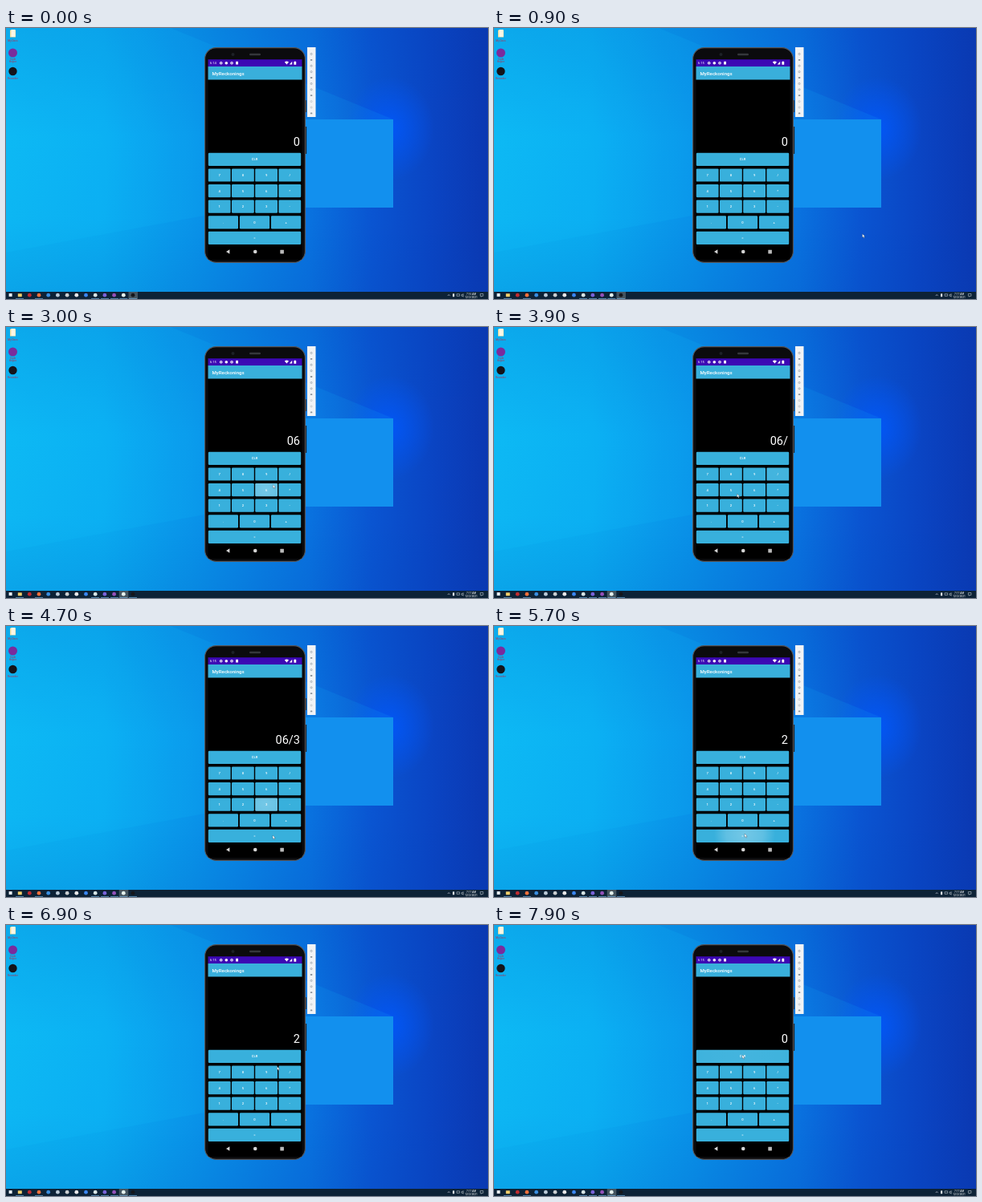
These frames come from a looping animation (600 by 338 pixels, 8 s). An HTML page:

```html
<!DOCTYPE html>
<html lang="en">
<head>
<meta charset="utf-8">
<title>Calculator demo</title>
<style>
html, body { margin: 0; width: 100%; height: 100%; overflow: hidden; background: #0a63d8; }
svg { display: block; width: 100vw; height: 100vh; }
text { font-family: Roboto, "Noto Sans", sans-serif; fill: #fff; }
.mid { text-anchor: middle; }
.label { font-size: 3.2px; fill: #b03050; }
</style>
</head>
<body>
<svg id="stage" viewBox="0 0 600 338" preserveAspectRatio="none">
  <defs>
    <linearGradient id="sky">
      <stop offset="0" stop-color="#0cb6f3"/>
      <stop offset=".2" stop-color="#0aaef2"/>
      <stop offset=".4" stop-color="#0994ea"/>
      <stop offset=".63" stop-color="#0973e0"/>
      <stop offset=".76" stop-color="#0a55d2"/>
      <stop offset=".88" stop-color="#0a45c4"/>
      <stop offset="1" stop-color="#0b38b2"/>
    </linearGradient>
    <linearGradient id="shade" x2="0" y2="1">
      <stop offset="0" stop-color="#0040b0" stop-opacity=".14"/>
      <stop offset=".4" stop-color="#0040b0" stop-opacity="0"/>
      <stop offset=".7" stop-color="#0040b0" stop-opacity=".02"/>
      <stop offset="1" stop-color="#0040b0" stop-opacity=".16"/>
    </linearGradient>
    <radialGradient id="glow">
      <stop offset="0" stop-color="#0058ff" stop-opacity=".8"/>
      <stop offset="1" stop-color="#0058ff" stop-opacity="0"/>
    </radialGradient>
    <radialGradient id="wave">
      <stop offset="0" stop-color="#fff" stop-opacity=".3"/>
      <stop offset=".6" stop-color="#fff" stop-opacity=".2"/>
      <stop offset="1" stop-color="#fff" stop-opacity="0"/>
    </radialGradient>
  </defs>
  <rect width="600" height="338" fill="url(#sky)"/>
  <rect width="600" height="338" fill="url(#shade)"/>
  <ellipse cx="478" cy="125" rx="55" ry="65" fill="url(#glow)"/>
  <path d="M482 114L205 0H0V280L482 190z" fill="#18ccff" opacity=".1"/>
  <rect x="372" y="114" width="110" height="110" fill="#1290ee"/>
  <g id="desk"></g>
  <g id="bar"></g>
  <g id="phone"></g>
  <g id="keys"></g>
  <path id="cursor" d="M0 0V4.4L1.1 3.5L1.9 5.2L2.7 4.8L1.9 3.2H3.2z" fill="#fff" stroke="#234" stroke-width=".3"/>
</svg>
<script>
const LOOP = 8000;
const $ = id => document.getElementById(id);

function add(parent, tag, attrs, text) {
  const el = document.createElementNS('http://www.w3.org/2000/svg', tag);
  for (const k in attrs) el.setAttribute(k, attrs[k]);
  if (text !== undefined) el.textContent = text;
  parent.appendChild(el);
  return el;
}
const box = (p, x, y, width, height, fill, rx = 0) => add(p, 'rect', { x, y, width, height, fill, rx });
const dot = (p, cx, cy, r, fill) => add(p, 'circle', { cx, cy, r, fill });
const write = (p, x, y, size, str, more) => add(p, 'text', { x, y, 'font-size': size, ...more }, str);
const mid = { class: 'mid' };

// desktop icons
const desk = $('desk');
box(desk, 5, 2.5, 7, 9, '#f3dfa0', .6);
box(desk, 6.5, 2, 5, 9, '#fbf6e6', .4);
dot(desk, 8.5, 31, 5.5, '#7a2c9c');
dot(desk, 8.5, 54, 5.2, '#14141a');
[[17, 'My Docs'], [39.5, 'Code'], [42.5, 'Helper'], [63.5, 'Recorder']].forEach(([y, s]) =>
  add(desk, 'text', { x: 8.5, y, class: 'mid label' }, s));

// taskbar
const bar = $('bar');
box(bar, 0, 329, 600, 9, '#0d2236');
const active = box(bar, 152.5, 329, 11.5, 9, '#44545f');
box(bar, 3.6, 331, 4, 4, '#e8f0f4');
box(bar, 14.8, 331.2, 5, 4, '#f2cf6b', .4);
['#c02c30', '#f0703c', '#3a8ee0', '#b9c8d6', '#c9cdd0', '#e6e6e8', '#3b86f0',
  '#d7e4e4', '#7a62d8', '#9350b8', '#e4f0ec', '#15161b'].forEach((c, i) =>
  dot(bar, 29.3 + i * 11.7, 333.2, 2.4, c));
[17, 41, 111, 123, 135, 146.3, 158].forEach(x => box(bar, x - 5, 337.3, 10, .7, '#6fa9d6'));
add(bar, 'path', { d: 'M549.8 334l1.4-1.5 1.4 1.5', fill: 'none', stroke: '#dde', 'stroke-width': .6 });
box(bar, 556, 331.3, 2.2, 4, '#dfe6ea', .4);
add(bar, 'path', {
  d: 'M561 331.8h3.6v2.5H561zM567 332.6h1l1.2-1v3.6l-1.2-1h-1zM590.4 331.5h3.6v2.8h-1.6l-.8 1v-1h-1.2z',
  fill: 'none', stroke: '#dde4e8', 'stroke-width': .5
});
const clock = write(bar, 579, 332.6, 3.3, '', mid);
write(bar, 579, 336.8, 3.3, '12/2/2021', mid);

// phone body and emulator strip
const phone = $('phone');
box(phone, 375, 24, 10.5, 87, '#f1f3f5');
for (let i = 0; i < 11; i++) {
  const y = 32.4 + i * 7.4;
  if (i % 3 === 1) box(phone, 378.9, y - .9, 2.4, 1.8, '#8b949c', .4);
  else add(phone, 'circle', { cx: 380.1, cy: y, r: 1.1, fill: 'none', stroke: i > 6 ? '#b3bac0' : '#87919a', 'stroke-width': .6 });
}
box(phone, 372, 90, 2, 15, '#3b3132', .6);
box(phone, 372, 123, 2.2, 34, '#20252c', .6);
add(phone, 'rect', { x: 247.6, y: 24.6, width: 124.8, height: 267.8, rx: 14, fill: '#0b0b0d', stroke: '#56565a', 'stroke-width': 1.1 });
box(phone, 251.5, 39, 117, 250, '#000', 2);
box(phone, 303, 31.8, 14, 2.4, '#34373b', 1.2);
dot(phone, 282.5, 33, 2, '#1d2126');
box(phone, 251.5, 39.2, 117, 9, '#3c08b4');
box(phone, 251.5, 48, 117, 16.5, '#39afdb');
const time = write(phone, 253.8, 45.4, 4.2, '');
[267.7, 274.3, 281, 287.5].forEach((x, i) =>
  i === 3 ? box(phone, x - 1.4, 41.8, 2.9, 3.8, '#fff', .4) : dot(phone, x, 43.8, 1.8, '#fff'));
dot(phone, 267.7, 43.8, .7, '#3c08b4');
dot(phone, 281, 43.8, .7, '#3c08b4');
add(phone, 'path', { d: 'M346.8 42.4q2.6-2 5.2 0l-2.6 3.2zM352.8 45.6h3.4v-3.8zM358.4 42h.8v-.6h1.2v.6h.8v3.8h-2.8z', fill: '#fff' });
write(phone, 256.5, 58.7, 6.1, 'MyReckonings', { 'font-weight': 500 });
const display = write(phone, 366, 147, 14.5, '0', { 'text-anchor': 'end' });
add(phone, 'path', { d: 'M274 279l4.4-2.7v5.4z', fill: '#d4d4d4' });
dot(phone, 310.2, 279, 2.3, '#d4d4d4');
box(phone, 341.3, 276.8, 4.6, 4.6, '#b9b9b9', .3);

// calculator keys, each with a clipped ripple
const keys = {};
function key(name, x, y, w, h) {
  const g = $('keys'), id = 'clip' + Object.keys(keys).length;
  box(add(g, 'clipPath', { id }), x, y, w, h, '#fff', 1.2);
  box(g, x, y, w, h, '#38b0dc', 1.2);
  const lit = add(g, 'g', { 'clip-path': `url(#${id})`, opacity: 0 });
  const wave = dot(lit, x + w / 2, y + h / 2, 0, 'url(#wave)');
  write(g, x + w / 2, y + h / 2 + 1.5, 4.2, name, { ...mid, 'font-weight': 500 });
  keys[name] = { lit, wave };
}
key('CLR', 251.8, 155.8, 115.4, 16.2);
['789/', '456*', '123-'].forEach((row, r) => [...row].forEach((c, i) =>
  key(c, 251.8 + i * 29.2, 175.4 + r * 19.6, 27.8, 16.2)));
[...'.0+'].forEach((c, i) => key(c, 251.8 + i * 39.1, 234.2, 37.2, 16.2));
key('=', 251.8, 253.8, 115.4, 16.2);

// [time, key, shown after the press]
const presses = [
  [2750, '6', '06'],
  [3300, '/', '06/'],
  [4350, '3', '06/3'],
  [5450, '=', '2'],
  [7300, 'CLR', '0']
];
// [time, x, y]
const path = [
  [800, 462, 262], [1500, 401, 170], [1900, 401, 170], [2600, 323, 203], [2850, 323, 203],
  [3250, 352, 183], [3450, 352, 183], [3900, 302.5, 208], [4250, 322, 221], [4420, 323, 222],
  [4700, 332, 261], [5300, 312, 259], [6200, 312, 259], [6900, 337.5, 176.5],
  [7250, 309, 162], [8000, 309, 162]
];
const ease = u => u * u * (3 - 2 * u);

function place(t) {
  const i = Math.max(1, path.findIndex(p => p[0] > t));
  const [a, x, y] = path[i - 1], [b, x2, y2] = path[i];
  const u = ease((t - a) / (b - a));
  return [x + (x2 - x) * u, y + (y2 - y) * u];
}

function draw(t) {
  const later = t >= 800;
  time.textContent = later ? '6:15' : '6:14';
  clock.textContent = later ? '7:17 AM' : '7:16 AM';
  active.setAttribute('x', t >= presses[0][0] ? 140.8 : 152.5);

  let shown = '0';
  for (const [at, name, out] of presses) {
    const dt = t - at, { lit, wave } = keys[name];
    if (dt >= 50) shown = out;
    const on = dt < 0 ? 0 : Math.min(1, dt / 80, Math.max(0, (650 - dt) / 250));
    lit.setAttribute('opacity', on);
    if (on) {
      const [x, y] = place(at);
      wave.setAttribute('cx', x);
      wave.setAttribute('cy', y);
      wave.setAttribute('r', 8 + dt * .12);
    }
  }
  display.textContent = shown;

  const cursor = $('cursor');
  cursor.setAttribute('visibility', later ? 'visible' : 'hidden');
  if (later) cursor.setAttribute('transform', `translate(${place(t)})`);
}

const start = performance.now();
function tick() {
  draw((performance.now() - start) % LOOP);
  requestAnimationFrame(tick);
}
tick();
</script>
</body>
</html>
```
